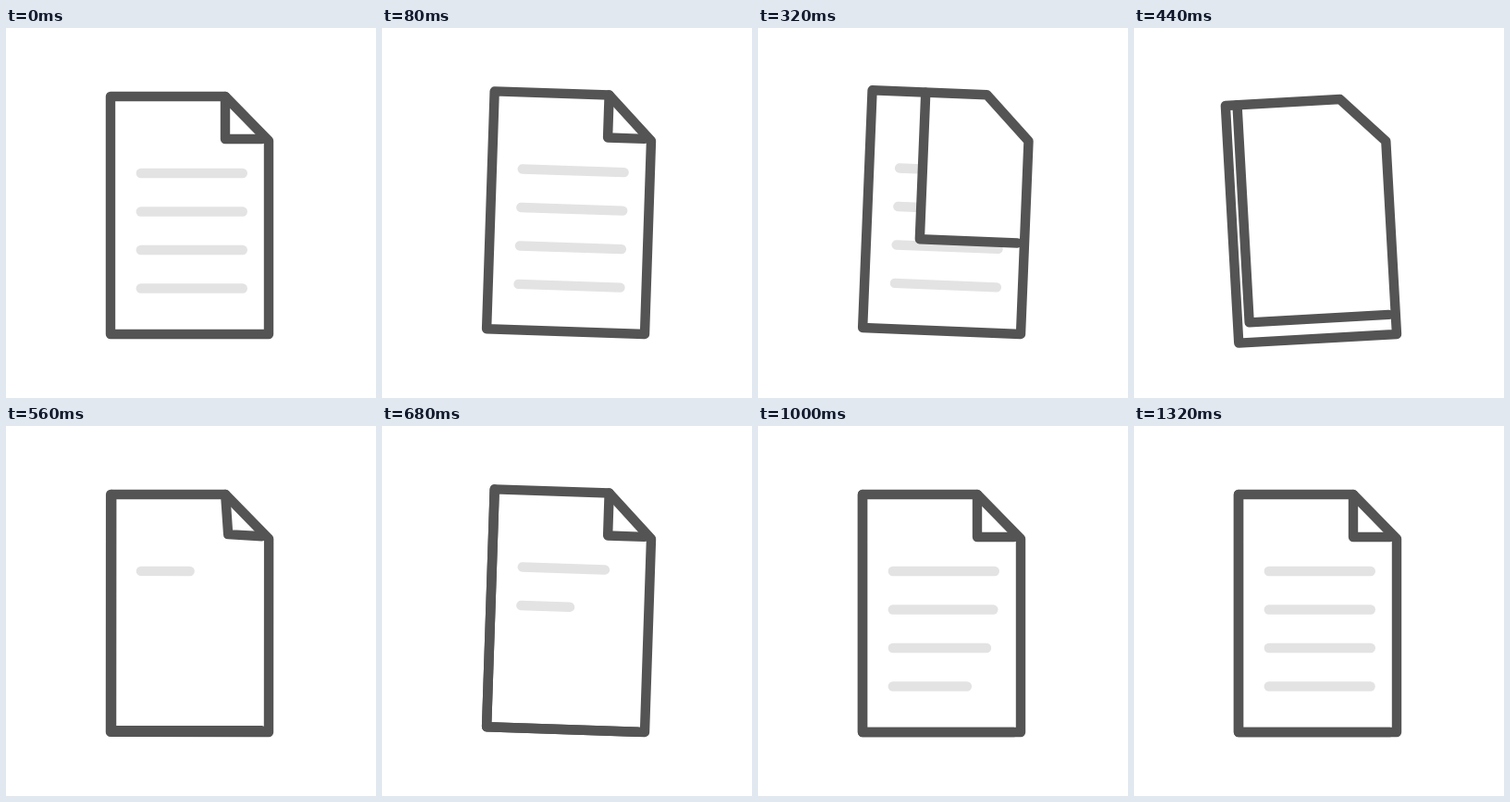
An HTML page with a canvas that plays this animation: 400x400 px, repeating every 1.96 s.

```html
<!DOCTYPE html>
<html>
<head>
<meta charset="utf-8">
<style>
  html, body { margin: 0; height: 100%; overflow: hidden; background: #fff; }
  canvas { display: block; width: 400px; height: 400px; }
</style>
</head>
<body>
<canvas id="stage"></canvas>
<script>
const LOOP = 1960, STEP = 40;
const INK = '#545454', TEXT = '#e3e3e3';
const LEFT = 113, TOP = 74, RIGHT = 284, BOTTOM = 331;
const EAR_X = 237, EAR_Y = 120, FOLD_END = 276.5;
const ROWS = [157, 198.5, 240, 281.5];
const SWING = [[0, 0], [230, 7.1], [420, -3.3], [660, 2], [840, -0.6], [960, 0]];

const canvas = document.getElementById('stage');
const ctx = canvas.getContext('2d');
const scale = window.devicePixelRatio || 1;
canvas.width = canvas.height = 400 * scale;

const mix = (a, b, k) => a + (b - a) * k;

function easeOut(t, start, duration) {
  const k = Math.min(1, Math.max(0, (t - start) / duration));
  return 1 - (1 - k) ** 4;
}

// Damped swing: cosine easing from one extreme to the next
function angleAt(t) {
  const i = SWING.findIndex(([time]) => time > t);
  if (i < 0) return 0;
  const [t0, a0] = SWING[i - 1], [t1, a1] = SWING[i];
  return mix(a0, a1, (1 - Math.cos(Math.PI * (t - t0) / (t1 - t0))) / 2);
}

function stroke(color, points, close) {
  ctx.beginPath();
  points.forEach(([x, y]) => ctx.lineTo(x, y));
  if (close) ctx.closePath();
  ctx.strokeStyle = color;
  ctx.stroke();
}

function textLine(y, progress) {
  if (progress > 0) stroke(TEXT, [[145.8, y], [145.8 + 110 * progress, y]]);
}

function draw(t) {
  ctx.setTransform(scale, 0, 0, scale, 0, 0);
  ctx.fillStyle = '#fff';
  ctx.fillRect(0, 0, 400, 400);
  ctx.translate(RIGHT, BOTTOM);
  ctx.rotate(angleAt(t) * Math.PI / 180);
  ctx.translate(-RIGHT, -BOTTOM);
  ctx.lineWidth = 10.4;
  ctx.lineCap = ctx.lineJoin = 'round';

  ROWS.forEach(y => textLine(y, 1));

  // The folded corner sweeps over the old sheet
  const turn = easeOut(t, 240, 460);
  const x = mix(EAR_X, LEFT, turn), y = mix(EAR_Y, BOTTOM, turn);
  if (turn > 0) ctx.fillRect(x, TOP, RIGHT - x, y - TOP);
  stroke(INK, [[x, TOP], [x, y], [FOLD_END, y]]);

  // The new sheet gets its lines and its own folded corner
  ROWS.forEach((row, i) => textLine(row, easeOut(t, 465 + 120 * i, 630)));
  const ear = easeOut(t, 440, 300);
  if (ear > 0) {
    stroke(INK, [
      [EAR_X, TOP],
      [mix(260.5, EAR_X, ear), mix(98, EAR_Y, ear)],
      [FOLD_END, mix(114, EAR_Y, ear)]
    ]);
  }

  stroke(INK, [[LEFT, TOP], [EAR_X, TOP], [RIGHT, 122], [RIGHT, BOTTOM], [LEFT, BOTTOM]], true);
}

const begin = performance.now();
function tick() {
  const t = (performance.now() - begin) % LOOP;
  draw(Math.floor(t / STEP) * STEP);
  requestAnimationFrame(tick);
}
tick();
</script>
</body>
</html>
```
